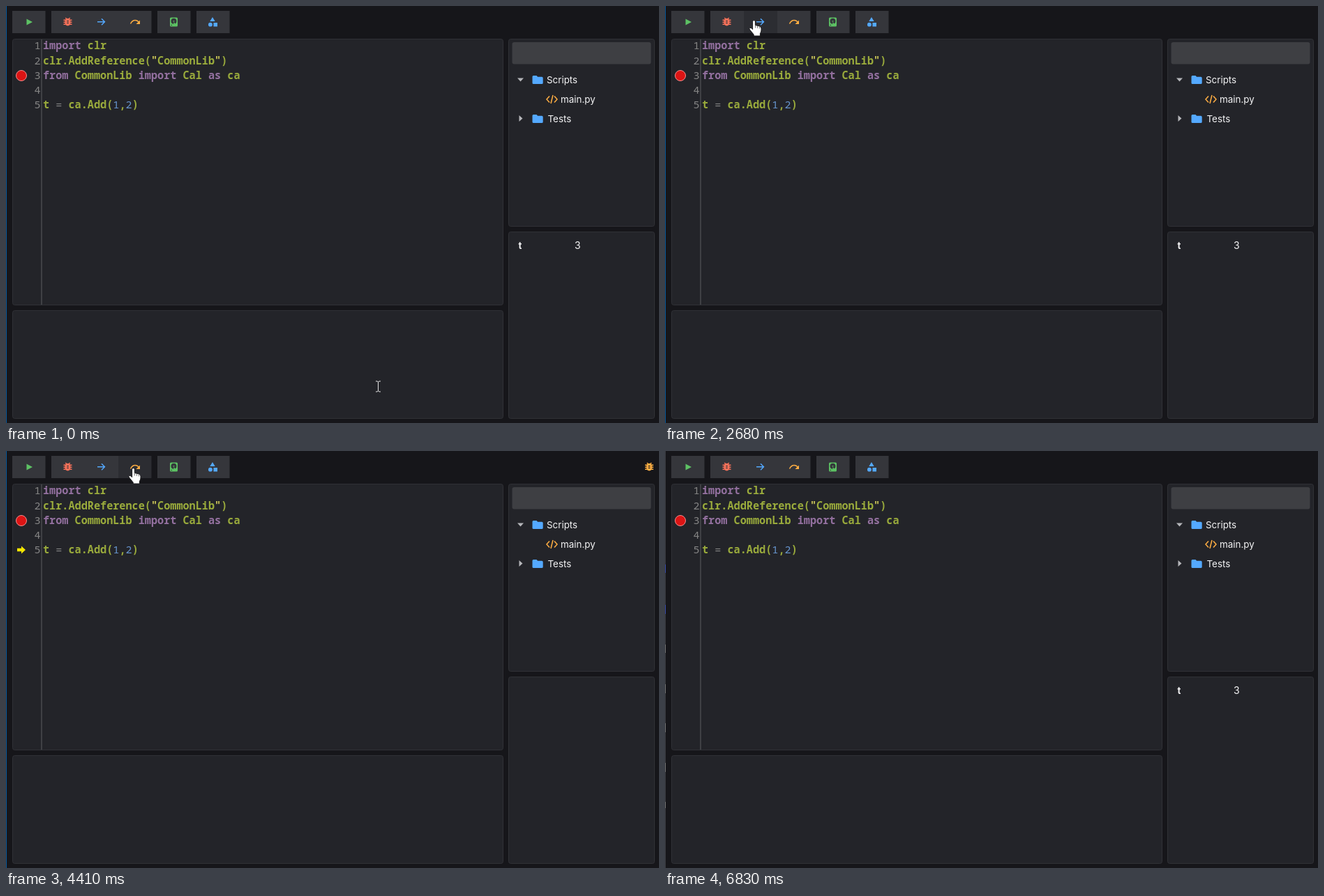
Write an HTML page that moves like this. It is 936 by 599 pixels and loops after 6920 ms.

```html
<!DOCTYPE html>
<html lang="en">
<head>
<meta charset="utf-8">
<title>Script debugger</title>
<style>
  html, body { margin: 0; width: 100%; height: 100%; overflow: hidden; background: #16161a; }
  svg { display: block; }
  text { white-space: pre; }
  .panel { fill: #232429; stroke: #303136; }
  .code { font: 600 15.2px "Noto Sans Mono", monospace; fill: #9aab3c; }
  .keyword { fill: #93709f; }
  .number { fill: #6795ce; font-weight: 400; }
  .quote { fill: #c2bd55; }
  .plain { fill: #858585; font-weight: 400; }
  .label { font: 13.4px Inter, sans-serif; fill: #f4f4f5; }
  .tip { font: 14px "Noto Sans CJK SC", "Noto Sans CJK", sans-serif; fill: #16161a; }
  .line { fill: none; stroke: currentColor; }
  .blue { color: #54a9ff; }
  .orange { color: #ffae43; }
  .green { color: #5dc264; }
  .red { color: #fc725a; }
</style>
</head>
<body>
<svg width="936" height="599" viewBox="0 0 936 599">
  <defs>
    <g id="bug">
      <path fill="currentColor" fill-rule="evenodd" d="M-3.800-1.400a3.800 3.800 0 0 1 7.600 0v3a3.800 3.800 0 0 1-7.600 0zM-1.400-2h2.800v1.300h-2.800zM-1.400.8h2.800v1.300h-2.800z"/>
      <path class="line" stroke-width="1.400" d="M-6-2.800h3M-6 .2h3M-6 3.200h3M6-2.800h-3M6 .2h-3M6 3.200h-3M-3.200-6l2 2M3.200-6l-2 2"/>
    </g>
    <path id="folder" fill="currentColor" d="M754.500 101.500q0-1.500 1.500-1.500h4.500l1.600 1.800h6q1.600 0 1.600 1.600v7q0 1.600-1.600 1.600h-12q-1.600 0-1.600-1.600z"/>
  </defs>

  <rect width="936" height="599" fill="#16161a"/>
  <rect id="edge" width="1" height="599" fill="#075b9e"/>
  <g id="edgeRemnant" fill="#3b3c42">
    <rect width="1" height="599"/>
    <path fill="#3d50b0" d="M0 163h1v12H0zM0 221h1v13H0z"/>
    <path fill="#777" d="M0 278h1v12H0zM0 335h1v13H0zM0 391h1v13H0zM0 448h1v13H0zM0 504h1v9H0z"/>
  </g>

  <g id="buttons"></g>
  <path class="green" fill="currentColor" d="M29.500 18.500L38 23l-8.500 4.500z"/>
  <use href="#bug" class="red" x="88.500" y="23"/>
  <path class="line blue" stroke-width="1.400" d="M131 22.700h10.500M137 18.200l4.500 4.500-4.500 4.500"/>
  <g class="orange">
    <path class="line" stroke-width="1.500" d="M178.500 25.500Q181 20.500 185 20.500T190.500 24"/>
    <path fill="currentColor" d="M192 20.500V26h-5.500z"/>
  </g>
  <g class="green">
    <rect x="235" y="16.500" width="11" height="13" rx="1.500" fill="currentColor"/>
    <circle cx="240.500" cy="21.800" r="4" fill="#35363b"/>
    <circle cx="240.500" cy="21.800" r=".9" fill="currentColor"/>
    <path class="line" stroke-width="1.300" d="M240.500 24l3 4"/>
    <circle cx="237.300" cy="27.500" r=".7" fill="#35363b"/>
  </g>
  <path class="blue" fill="currentColor" d="M296 16l3.700 6h-7.400zM297.500 24h5.500v5.500h-5.500zM290 26.700a2.900 2.900 0 0 1 5.800 0a2.900 2.900 0 0 1-5.800 0z"/>
  <use id="statusBug" href="#bug" class="orange" x="922" y="23"/>

  <rect class="panel" x="9.500" y="47.500" width="703" height="382" rx="3"/>
  <rect class="panel" x="9.500" y="437.500" width="703" height="155" rx="3"/>
  <rect class="panel" x="720.500" y="47.500" width="209" height="269" rx="3"/>
  <rect class="panel" x="720.500" y="324.500" width="209" height="268" rx="3"/>

  <path stroke="#5c5d61" d="M51 48v381"/>
  <g id="lineNumbers" class="code" text-anchor="end"></g>
  <g class="code">
    <text x="53" y="62"><tspan class="keyword">import</tspan> clr</text>
    <text x="53" y="84">clr.AddReference(<tspan class="quote">"</tspan>CommonLib<tspan class="quote">"</tspan>)</text>
    <text x="53" y="105"><tspan class="keyword">from</tspan> CommonLib <tspan class="keyword">import</tspan> Cal <tspan class="keyword">as</tspan> ca</text>
    <text x="53" y="147">t <tspan class="plain">=</tspan> ca.Add(<tspan class="number">1</tspan>,<tspan class="number">2</tspan>)</text>
  </g>
  <rect id="caret" x="135" y="69" width="1" height="21" fill="#eee"/>
  <circle cx="22" cy="100" r="7.500" fill="#dc1414" stroke="#f48e8e"/>
  <path id="stepArrow" fill="#f5e600" d="M-6-2.200H0V-5.500L6 0 0 5.500V2.200H-6z"/>

  <rect id="search" x="725.500" y="52" width="199" height="31.500" rx="3" fill="#fff"/>
  <path fill="#b5b6ba" d="M733 103.500h9l-4.500 5zM735.500 157l5 4.500-5 4.500z"/>
  <use href="#folder" class="blue"/>
  <use href="#folder" class="blue" y="56"/>
  <path class="line orange" stroke-width="1.500" d="M779 129.500l-4 4.500 4 4.500M786 129.500l4 4.500-4 4.500M784 128l-3 12"/>
  <g class="label">
    <text x="775" y="111">Scripts</text>
    <text x="795" y="139">main.py</text>
    <text x="776.500" y="167">Tests</text>
    <g id="variables">
      <text x="734.500" y="348.500" font-weight="700">t</text>
      <text x="815" y="348.500" font-size="14">3</text>
    </g>
  </g>

  <g id="tooltip">
    <rect id="tipBox" height="38" rx="4" fill="#a7abb0"/>
    <text class="tip" x="12" y="24"></text>
  </g>
  <g id="cursor" stroke-linejoin="round">
    <g id="hand">
      <path fill="#fff" stroke="#17171a" d="M-1.900 1a1.900 1.900 0 0 1 3.800 0v5l6 1.500q2.600.8 2.600 3.300v2.700q0 2.200-1.600 4.500v3.500H-.3v-2L-6 12.500q-1.300-1.800.4-2.500 1.300-.4 2.500.8l1.200 1.400z"/>
      <path stroke="#555" stroke-width=".8" d="M2 6v4M4.900 7v3.500M7.800 8v3"/>
    </g>
    <path id="arrow" fill="#fff" stroke="#17171a" d="M0 0v15.500l3.600-3.400 2.500 5.700 2.400-1-2.500-5.600H11z"/>
    <path id="beam" fill="none" stroke="#e5e5e5" d="M-3.500-7.500H-1.500L0-6.500 1.500-7.500H3.500M0-6.500v13M-3.500 7.500H-1.500L0 6.500 1.500 7.500H3.500"/>
  </g>
</svg>
<script>
const LOOP = 6920;
const el = id => document.getElementById(id);
const show = (id, on) => el(id).setAttribute("visibility", on ? "visible" : "hidden");
const between = (t, spans) => spans.some(([from, to]) => t >= from && t < to);

const buttonX = [9, 65, 113, 161, 217, 273];
const searchArea = [725, 52, 200, 31];
el("buttons").innerHTML = buttonX.map(x =>
  `<rect x="${x}" y="7" width="${x > 64 && x < 160 ? 48 : 47.5}" height="32"/>`).join("");
const buttons = [...el("buttons").children];
el("lineNumbers").innerHTML = [1, 2, 3, 4, 5].map(n =>
  `<text class="plain" x="49.500" y="${Math.round(62.4 + 21.2 * (n - 1))}">${n}</text>`).join("");

// time, x, y
const path = [
  [0, 533, 546], [30, 533, 546], [150, 478, 484], [440, 165, 118], [600, 103, 47],
  [740, 92, 30], [1040, 89, 29], [1190, 89, 29], [1550, 138, 21], [2650, 138, 21],
  [2780, 92, 23], [2950, 92, 23], [3130, 160, 17], [3340, 168, 16], [3520, 190, 20],
  [3780, 190, 20], [3960, 183, 24], [4150, 183, 24], [4180, 182, 25], [5190, 182, 25],
  [5450, 440, 95], [5650, 728, 75], [5840, 772, 82], [5860, 778, 87], [6520, 792, 600]
];
const caretOn = [[350, 1410], [1940, 2470], [2820, 3350], [3880, 4410], [4940, 5470], [6000, 6520]];
const sessions = [[880, 1940], [2820, 4940]];
const tips = [
  { from: 1750, to: 1930, x: 138, y: 41, width: 78, text: "继续(F5)" },
  { from: 3570, to: 3880, x: 190, y: 40, width: 114, text: "单步跳过(F10)" }
];

function pointerAt(t) {
  const i = path.findIndex(p => p[0] > t);
  if (t <= 0) return path[0].slice(1);
  if (i < 0) return path.at(-1).slice(1);
  const [t0, x0, y0] = path[i - 1], [t1, x1, y1] = path[i];
  const k = (t - t0) / (t1 - t0);
  return [x0 + (x1 - x0) * k, y0 + (y1 - y0) * k];
}

const inside = ([px, py], [x, y, w, h]) => px >= x && px < x + w && py >= y && py < y + h;

// Share of the last 150 ms spent over an area, giving a linear hover fade.
function hover(t, area) {
  let hits = 0;
  for (let k = 0; k < 10; k++) hits += inside(pointerAt(t - k * 15), area);
  return hits / 10;
}

function cursorKind(p) {
  if (buttonX.some(x => inside(p, [x, 7, 48, 32]))) return "hand";
  const textAreas = [[52, 47, 661, 383], [9, 437, 704, 156], searchArea];
  return textAreas.some(area => inside(p, area)) ? "beam" : "arrow";
}

function draw(t) {
  const running = between(t, sessions);
  show("statusBug", running);
  show("variables", !running);
  show("caret", between(t, caretOn));
  show("edge", t < 6830);
  show("edgeRemnant", t >= 6830);

  const line = t < 3880 ? 3 : t < 4340 ? 4 : 5;
  show("stepArrow", running);
  el("stepArrow").setAttribute("transform", `translate(22 ${100 + 21 * (line - 3)})`);

  buttons.forEach((button, i) => {
    const level = hover(t, [buttonX[i], 7, 48, 32]);
    button.style.fill = `rgb(${[53, 54, 59].map(c => c - 9 * level)})`;
  });
  el("search").setAttribute("fill-opacity", 0.12 + 0.04 * hover(t, searchArea));

  const tip = tips.find(({ from, to }) => t >= from && t < to);
  show("tooltip", tip);
  if (tip) {
    el("tooltip").setAttribute("transform", `translate(${tip.x} ${tip.y})`);
    el("tooltip").setAttribute("opacity", Math.min(1, (t - tip.from) / 150));
    el("tipBox").setAttribute("width", tip.width);
    el("tooltip").querySelector("text").textContent = tip.text;
  }

  const p = pointerAt(t);
  const kind = cursorKind(p);
  for (const name of ["hand", "arrow", "beam"]) show(name, name === kind && t < 6520);
  el("cursor").setAttribute("transform", `translate(${p.map(v => Math.round(v) + 0.5).join(" ")})`);
}

const start = performance.now();
function tick() {
  draw((performance.now() - start) % LOOP);
  requestAnimationFrame(tick);
}
tick();
</script>
</body>
</html>
```
